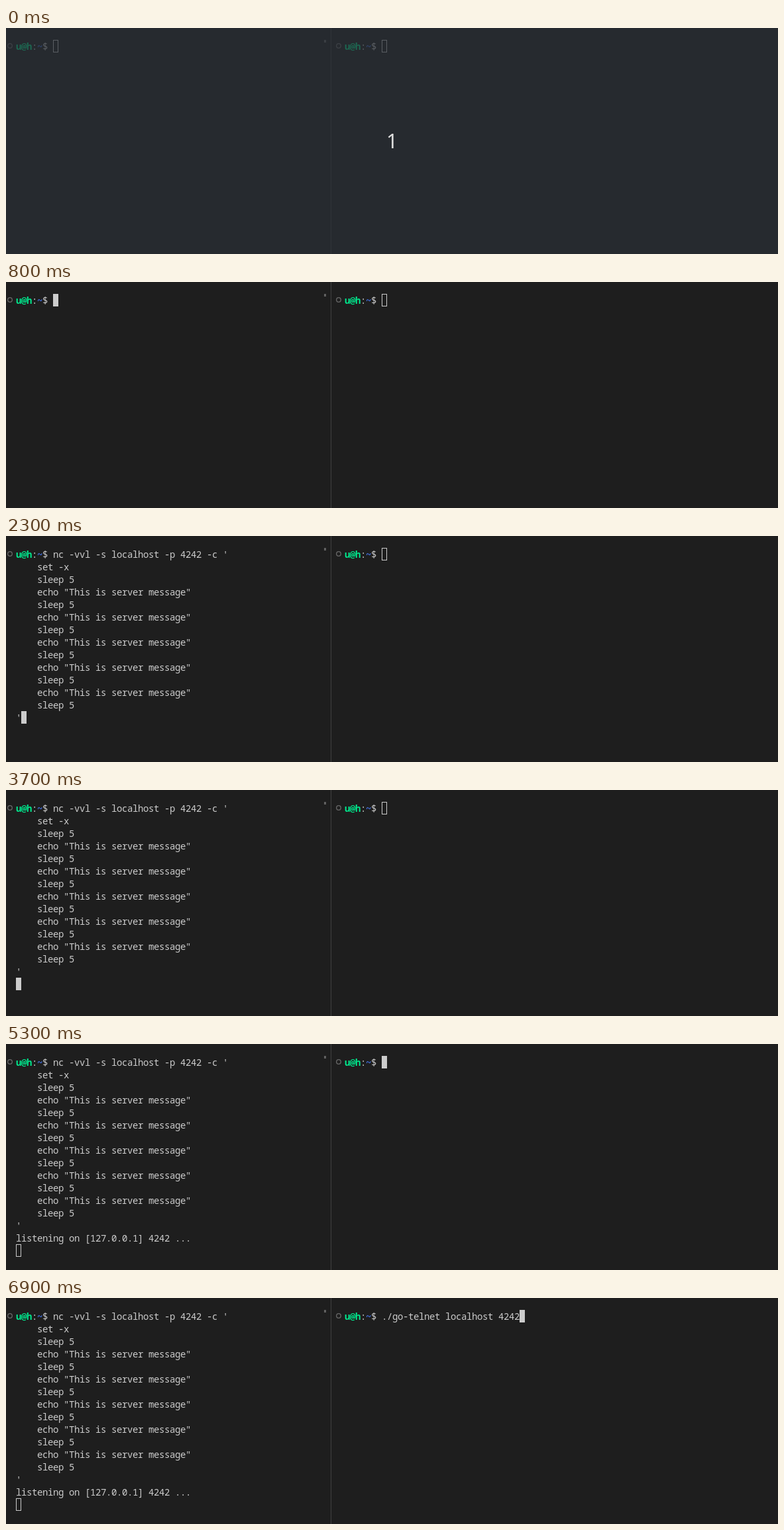
An HTML page with a canvas for the animation above (8 s loop, 1165x342 px).

```html
<!DOCTYPE html>
<html lang="en">
<head>
<meta charset="utf-8">
<title>Two terminals</title>
<style>
  html, body { margin: 0; height: 100%; overflow: hidden; background: #1e1e1e; }
  canvas { display: block; }
</style>
</head>
<body>
<canvas id="stage" width="1165" height="342"></canvas>
<script>
const ctx = document.getElementById('stage').getContext('2d', { alpha: false });
const LOOP = 8000, CELL = 8, ROW = 19, TOP = 18;
const FG = '#cccccc', GREEN = '#00e68c', BLUE = '#4373e8';
const LEFT = 15, RIGHT = 511, PROMPT_COLS = 7;

const say = '    echo "This is server message"\n    sleep 5\n';
const script = "nc -vvl -s localhost -p 4242 -c '\n    set -x\n    sleep 5\n" + say.repeat(5);
const command = script + "'";
const reply = '\nlistening on [127.0.0.1] 4242 ...\n';

// Each entry: start time, text after the prompt, filled cursor
const leftSteps = [
  [0, '', false],
  [800, '', true],
  [1700, 'clear', true],
  [2200, script.trimEnd(), true],
  [2300, command, true],
  [3700, command + '\n', true],
  [3800, command + reply, true],
  [5300, command + reply, false]
];
const rightSteps = [
  [0, '', false],
  [5300, '', true],
  [6300, 'clear', true],
  [6900, './go-telnet localhost 4242', true]
];

function write(text, x, row, color, bold) {
  ctx.font = `${bold ? 'bold ' : ''}14px "Noto Sans Mono", monospace`;
  ctx.fillStyle = color;
  [...text].forEach((ch, i) => ctx.fillText(ch, x + i * CELL, TOP + row * ROW + 15));
}

function drawCursor(x, row, filled) {
  const y = TOP + row * ROW;
  ctx.fillStyle = ctx.strokeStyle = FG;
  ctx.lineWidth = 1;
  if (filled) ctx.fillRect(x, y, CELL, ROW);
  else ctx.strokeRect(x + 0.5, y + 0.5, CELL - 1, ROW - 1);
}

function drawTerminal(x, steps, time) {
  const [, text, filled] = steps.findLast(step => step[0] <= time);

  ctx.strokeStyle = '#6a6a6a';
  ctx.lineWidth = 1.3;
  ctx.beginPath();
  ctx.arc(x - 9, 27, 3.3, 0, Math.PI * 2);
  ctx.stroke();

  write('u@h', x, 0, GREEN, true);
  write(':', x + 3 * CELL, 0, FG);
  write('~', x + 4 * CELL, 0, BLUE, true);
  write('$', x + 5 * CELL, 0, FG);

  const lines = text.split('\n');
  const indent = row => x + (row ? 0 : PROMPT_COLS * CELL);
  lines.forEach((line, row) => write(line, indent(row), row, FG));
  const last = lines.length - 1;
  drawCursor(indent(last) + lines[last].length * CELL, last, filled);
}

function drawCountdown() {
  ctx.fillStyle = 'rgba(42, 47, 55, 0.7)';
  ctx.fillRect(0, 0, 1165, 342);
  ctx.font = '30px "Noto Sans", sans-serif';
  ctx.fillStyle = '#dedede';
  ctx.textAlign = 'center';
  ctx.fillText('1', 582.5, 182);
  ctx.textAlign = 'left';
}

function draw() {
  const time = performance.now() % LOOP;
  ctx.fillStyle = '#1e1e1e';
  ctx.fillRect(0, 0, 1165, 342);
  ctx.fillStyle = '#414141';
  ctx.fillRect(490, 0, 1, 342);
  ctx.fillStyle = '#606060';
  ctx.fillRect(480, 18, 3, 4);
  drawTerminal(LEFT, leftSteps, time);
  drawTerminal(RIGHT, rightSteps, time);
  if (time < 200) drawCountdown();
  requestAnimationFrame(draw);
}
draw();
</script>
</body>
</html>
```
